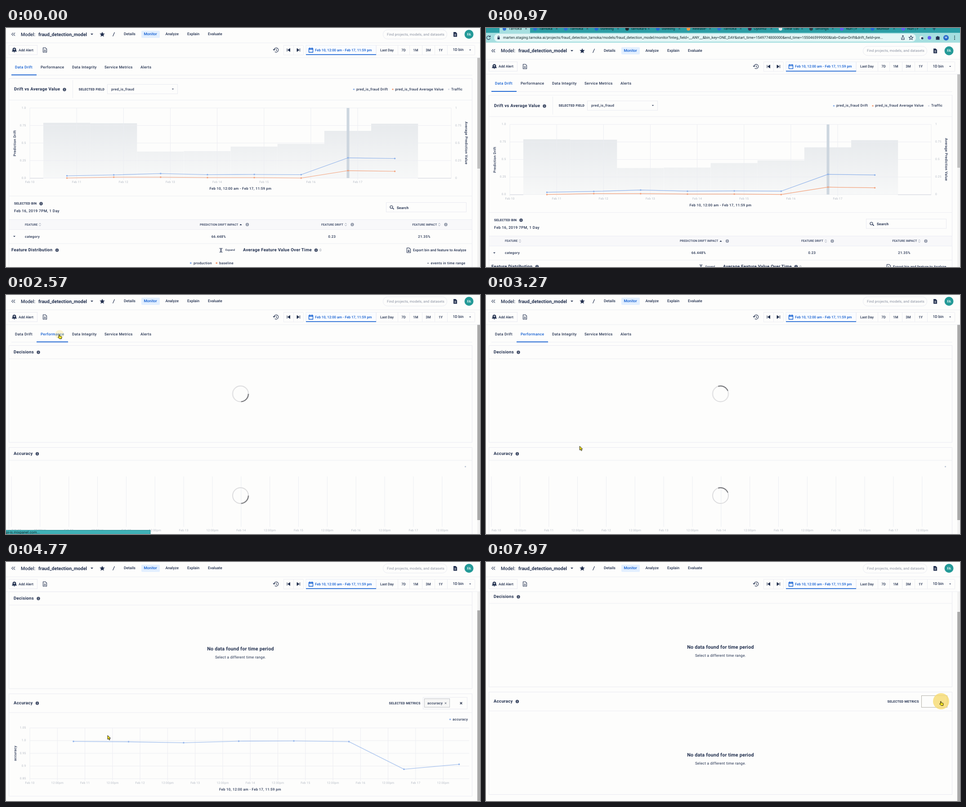
An HTML page for the animation above (8000 ms loop, 1054 by 532 pixels).

```html
<!DOCTYPE html>
<html lang="en">
<head>
<meta charset="utf-8">
<title>Model monitoring</title>
<style>
html, body { margin: 0; width: 100%; height: 100%; overflow: hidden; background: #fdfdfc; }
svg { display: block; width: 1054px; height: 532px; }
text { font: 500 7.8px Roboto, Arial, sans-serif; fill: #22304f; dominant-baseline: central; text-rendering: geometricPrecision; white-space: pre; }
.nav { font-size: 8.4px; }
.tab { font-size: 8.4px; letter-spacing: .3px; }
.model { font-size: 10.5px; }
.h { font-size: 9.6px; font-weight: 700; letter-spacing: .3px; }
.big { font-size: 10.8px; font-weight: 700; letter-spacing: .18px; }
.cap { font-size: 7.2px; font-weight: 700; letter-spacing: .22px; }
.th { font-size: 6.6px; font-weight: 700; letter-spacing: .1px; fill: #45516d; }
.b { letter-spacing: .32px; }
.ax { font-size: 6.6px; font-weight: 400; letter-spacing: .2px; fill: #b4bac4; }
.hint { font-weight: 400; letter-spacing: .15px; fill: #8990a0; }
.sub { font-size: 8.4px; font-weight: 400; letter-spacing: .2px; }
.date { letter-spacing: .36px; font-size: 8.4px; }
.tiny { font-size: 6px; letter-spacing: .2px; }
.url { font-size: 8.2px; font-weight: 400; fill: #10282b; }
.bold { font-weight: 700; }
.blue { fill: #0d5bd0; }
.white { fill: #fff; }
.edge { fill: none; stroke: #e9eaf1; }
.grid { stroke: #ecedf2; fill: none; }
.ink { fill: none; stroke: #22304f; stroke-width: 1.1; }
.solid { fill: #22304f; }
.paper { fill: #fdfdfc; }

.cut { animation: 8s step-end infinite; }
.move { animation: 8s ease-in-out infinite; }
#app { animation-name: app; }
#drift { animation-name: drift; }
#perf { animation-name: perf; }
#scroll { animation-name: scroll; }
#thumb { animation-name: thumb; }
#status { animation-name: status; }
#loading { animation-name: loading; }
#loaded { animation-name: loaded; }
#data { animation-name: data; }
#cleared { animation-name: cleared; }
#tabDrift { animation-name: tabDrift; }
#tabPerf { animation-name: tabPerf; }
#bar { animation-name: bar; }
#cursor { animation-name: cursor; }
#arrow { animation-name: arrow; }
#hand { animation-name: hand; }
#halo { animation-name: halo; }
.spin { animation: spin 1s -.43s linear infinite; }

@keyframes app { 0%, 1.5% { transform: none } 5%, 11.9% { transform: translateY(37px) } 15.6%, 100% { transform: none } }
@keyframes drift { 0% { opacity: 1 } 31.25%, 100% { opacity: 0 } }
@keyframes perf { 0% { opacity: 0 } 31.25%, 100% { opacity: 1 } }
@keyframes scroll { 0%, 55.6% { transform: none } 60.6%, 100% { transform: translateY(-50px) } }
@keyframes thumb {
  0%, 1.5% { y: 66px; height: 247px; fill: #c1c1c1 }
  5%, 11.9% { y: 66px; height: 208px; fill: #c1c1c1 }
  15.6%, 31.24% { y: 66px; height: 247px; fill: #c1c1c1 }
  31.25%, 42.49% { y: 66px; height: 435px; fill: #aaa }
  42.5%, 55.6% { y: 66px; height: 424px; fill: #aaa }
  60.6%, 100% { y: 111px; height: 424px; fill: #aaa }
}
@keyframes status { 0% { opacity: 0 } 31.25% { opacity: 1 } 38.75%, 100% { opacity: 0 } }
@keyframes loading { 0% { opacity: 1 } 42.5%, 100% { opacity: 0 } }
@keyframes loaded { 0% { opacity: 0 } 42.5%, 100% { opacity: 1 } }
@keyframes data { 0% { opacity: 1 } 97.5%, 100% { opacity: 0 } }
@keyframes cleared { 0% { opacity: 0 } 97.5%, 100% { opacity: 1 } }
@keyframes tabDrift { 0% { fill: #0d5bd0 } 31.25%, 100% { fill: #22304f } }
@keyframes tabPerf { 0% { fill: #22304f } 17.5%, 100% { fill: #0d5bd0 } }
@keyframes bar { 0% { x: 12px; width: 56px } 31.25%, 100% { x: 68px; width: 70px } }
@keyframes cursor {
  0%, 11.5% { transform: translate(270px, -25px) }
  19.6% { transform: translate(137px, 94px) }
  23.8%, 33% { transform: translate(119px, 88px) }
  44%, 62.9% { transform: translate(226px, 386px) }
  68.4%, 75% { transform: translate(701px, 355px) }
  88%, 100% { transform: translate(1012px, 310px) }
}
@keyframes arrow { 0% { opacity: 1 } 17.5% { opacity: 0 } 34.5% { opacity: 1 } 86%, 100% { opacity: 0 } }
@keyframes hand { 0% { opacity: 0 } 17.5% { opacity: 1 } 34.5% { opacity: 0 } 86%, 100% { opacity: 1 } }
@keyframes halo {
  0%, 29% { opacity: 0; transform: scale(.4) }
  30%, 31.25% { opacity: .8; transform: scale(1) }
  32.2% { opacity: .3; transform: scale(.55) }
  32.8%, 95.9% { opacity: 0; transform: scale(.4) }
  97.2%, 100% { opacity: .8; transform: scale(1) }
}
@keyframes spin { to { transform: rotate(360deg) } }
</style>
</head>
<body>
<svg id="stage" viewBox="0 0 1054 532"></svg>
<script>
const text = (x, y, s, cls = '', anchor = 'start', extra = '') =>
  `<text x="${x}" y="${y}" class="${cls}" text-anchor="${anchor}" ${extra}>${s.replace(/&/g, '&amp;')}</text>`;
const mid = (x, y, s, cls) => text(x, y, s, cls, 'middle');
const end = (x, y, s, cls) => text(x, y, s, cls, 'end');
const rect = (x, y, w, h, attrs) => `<rect x="${x}" y="${y}" width="${w}" height="${h}" ${attrs}/>`;
const path = (d, attrs = 'class="ink"') => `<path d="${d}" ${attrs}/>`;
const dot = (x, y, r, fill) => `<circle cx="${x}" cy="${y}" r="${r}" fill="${fill}"/>`;
const group = (attrs, ...parts) => `<g ${attrs}>${parts.join('')}</g>`;
const list = (n, f) => Array.from({ length: n }, (_, i) => f(i)).join('');
const hline = (x1, x2, y, cls = 'grid') => path(`M${x1} ${y}H${x2}`, `class="${cls}"`);
const vline = (x, y1, y2, cls = 'grid') => path(`M${x} ${y1}V${y2}`, `class="${cls}"`);
const caret = (x, y, r = 3) => path(`M${x - r} ${y - r / 2}h${2 * r}l${-r} ${r}z`, 'class="solid"');
const info = (x, y, fill = '#3d4963') => dot(x, y, 3.7, fill) +
  path(`M${x} ${y - .6}v2.6M${x} ${y - 2.2}v1`, 'stroke="#fff" fill="none"');
const sort = (x, y) => path(`M${x - 2} ${y - 1}l2 -2 2 2M${x - 2} ${y + 1}l2 2 2 -2`, 'fill="none" stroke="#7d869b" stroke-width=".9"');
const cross = (x, y, r, w) => path(`M${x - r} ${y - r}l${2 * r} ${2 * r}M${x + r} ${y - r}l${-2 * r} ${2 * r}`, `stroke="#333d55" stroke-width="${w}"`);
const sheet = (x, y, cls) => path(`M${x - 4} ${y - 5}h5.2l2.8 2.8v7.2h-8zM${x - 2} ${y}h4M${x - 2} ${y + 2.4}h4`, `class="${cls}"`);
const series = (x0, dx, ys, color) =>
  path('M' + ys.map((y, i) => `${x0 + dx * i} ${y}`).join('L'), `fill="none" stroke="${color}" stroke-width="1.2"`) +
  ys.map((y, i) => dot(x0 + dx * i, y, 1.8, color)).join('');
const spinner = (x, y) => group(`transform="translate(${x} ${y})"`,
  '<circle r="17.5" fill="none" stroke="#dcdcde" stroke-width="2"/>',
  path('M17.5 0A17.5 17.5 0 0 1 1.5 17.4', 'class="spin" fill="none" stroke="#66676b" stroke-width="2"'));

const BLUE = '#8fb2ea', ORANGE = '#f3a27c', RANGE = 'Feb 10, 12:00 am - Feb 17, 11:59 pm';

function browserBar() {
  const tabs = ['Tarnoka', 'Tarnoka', 'Tarnoka', 'odreling', 'tarnoka-s', 'odreling', 'Release-', 'Tarnoka', 'Optimiz', 'clear cac', 'Settings', 'Nurl | F', 'Monitor', 'Nurl | F'];
  const marks = ['#2f6fd6', '#2f6fd6', '#2f6fd6', '#2469d8', '#1d2730', '#2469d8', '#f39a3d', '#2f6fd6', '#3a2b4d', '#e9edf0', '#30404a', '#625df5', '#2469d8', '#625df5'];
  const url = 'marten.staging.tarnoka.ai/projects/fraud_detection_tarnoka/models/fraud_detection_model/monitor?integ_field=__ANY__&bin_key=ONE_DAY&start_time=1549774800000&end_time=1550465999000&tab=Data+Drift&drift_field=pre...';
  return group('transform="translate(0 -37)"',
    rect(0, -12, 1054, 24, 'fill="#2b9ea5"'),
    rect(0, 11, 1054, 22, 'fill="#a6dfe0"'),
    rect(30, -12, 68, 24, 'fill="#a6dfe0"'),
    tabs.map((name, i) => {
      const x = 50 + 68.2 * i;
      return dot(x - 9, 2, 4, marks[i]) + text(x, 2, name, 'url') + cross(x + 39, 2, 1.8, .9) + vline(x + 48, -2, 7, 'url');
    }).join(''),
    path('M993 2h7M996.5 -1.5v7'),
    rect(18, 13, 938, 17.5, 'rx="8.7" fill="#e4f6f6"'),
    path('M8.8 19.5A4 4 0 1 0 9.5 23M9.5 17v3h-3'),
    rect(25.5, 21, 5, 4.5, 'class="solid"'), path('M26.5 21v-1.5a1.5 1.5 0 0 1 3 0V21'),
    text(38, 22, url, 'url'),
    path('M924 21v5h6v-5M927 24v-7M925 19l2-2 2 2'),
    path('M945 17.5l1.3 3 3.2.3-2.4 2.1.7 3.1-2.8-1.6-2.8 1.6.7-3.1-2.4-2.1 3.2-.3z'),
    dot(968, 22, 4, '#e8f2f3'), dot(970, 23, 2.5, '#31435f'),
    dot(986, 22, 4, '#625df5'),
    path('M1000.5 19.5h2.5a1.5 1.5 0 0 1 3 0h2.5v7h-8z', 'class="solid"'),
    dot(1023, 22, 6, '#2467c9'), mid(1023, 22, 'M', 'tiny white'),
    [18.5, 22, 25.5].map(y => dot(1042, y, 1, '#10282b')).join(''));
}

function header() {
  const nav = [[262, 'Details'], [354.5, 'Analyze'], [403, 'Explain'], [449, 'Evaluate']];
  const dividers = [617.5, 639.5, 661.5, 823.5, 871.5, 897.5, 925.5, 953.5, 981.5, 1042.5];
  return rect(0, -4, 1054, 70, 'class="paper"') + hline(0, 1054, 33) + hline(0, 1054, 66) +
    path('M16 10.5l-3.2 3.5 3.2 3.5M20 10.5l-3.2 3.5 3.2 3.5') +
    text(33, 14, 'Model:', 'model') + text(72, 14, 'fraud_detection_model', 'model bold') + caret(191, 14) +
    path('M214 8.5l1.7 3.7 4 .4-3 2.7.9 4-3.6-2.1-3.6 2.1.9-4-3-2.7 4-.4z', 'class="solid"') +
    path('M237.5 18.5l4-9') +
    rect(301, 6, 41, 16, 'rx="2" fill="#e2efff"') + text(306.5, 14, 'Monitor', 'nav blue') +
    nav.map(([x, s]) => text(x, 14, s, 'nav')).join('') +
    rect(838.5, 4, 142, 20.5, 'rx="10" class="edge"') + text(847, 14, 'Find projects, models, and datasets', 'hint') +
    path('M995 9h5l3 3v7.5h-8z', 'class="solid"') + path('M997 14h4M997 16.5h4', 'stroke="#fff"') +
    dot(1029.5, 14, 10, '#249a98') + mid(1029.5, 14, 'FA', 'white') +
    rect(6.5, 38.5, 63, 21, 'class="edge"') +
    path('M13.5 52h10l-1.5-2v-2.5c0-4.5-7-4.5-7 0V50zM17 53.5h3', 'class="solid" stroke="#22304f"') +
    path('M18.5 45.5v4M16.5 47.5h4', 'stroke="#fff"') +
    text(28, 49, 'Add Alert') + sheet(86.5, 49, 'ink') +
    path('M596 49a4.8 4.8 0 1 1 1.6 3.6M594 47.5l2 2 2-2M600.8 46.5v3l2 1.2') +
    dividers.map(x => vline(x, 39, 60)).join('') +
    hline(617, 661, 38.5) + hline(617, 661, 60) + hline(823, 1042, 38.5) + hline(823, 1042, 60) +
    path('M625 45.5v7M631.5 45.5v7l-5-3.5z', 'class="solid" stroke="#22304f"') +
    path('M653.5 45.5v7M647 45.5v7l5-3.5z', 'class="solid" stroke="#22304f"') +
    rect(667, 38.5, 156, 20.5, 'fill="#fafcff" stroke="#e9edf5"') + rect(667, 58.5, 156, 1.6, 'class="blue"') +
    path('M673.5 45.5h9v8.5h-9zM673.5 47.5h9M675.5 43.5v2M680.5 43.5v2', 'fill="none" stroke="#0d5bd0" stroke-width="1.3"') +
    text(687, 49, RANGE, 'blue') + text(832, 49, 'Last Day') +
    [[884, '7D'], [911, '1M'], [939, '3M'], [966.5, '1Y']].map(([x, s]) => mid(x, 49, s)).join('') +
    text(993.5, 49, '1D bin', 'nav') + caret(1032, 49, 2);
}

const tabs = () =>
  text(20, 87.5, 'Data Drift', 'tab cut', 'start', 'id="tabDrift"') +
  text(77, 87.5, 'Performance', 'tab cut', 'start', 'id="tabPerf"') +
  text(147, 87.5, 'Data Integrity', 'tab') + text(219, 87.5, 'Service Metrics', 'tab') + text(299, 87.5, 'Alerts', 'tab') +
  hline(12, 1037, 105) + rect(12, 103.5, 56, 1.8, 'id="bar" class="cut blue"');

function driftPage() {
  const step = 104.15, x0 = 53;
  const tops = [211, 212, 275, 274, 264, 258, 229, 213];
  const rows = ['1.0', '0.75', '0.5', '0.25', '0.0'];
  const key = (x, s, c) => dot(x, 136.5, 1.7, c) + text(x + 5.5, 136, s, 'b');
  return '<linearGradient id="fade" gradientUnits="userSpaceOnUse" x1="0" x2="0" y1="205" y2="334"><stop stop-color="#e6e9ec"/><stop offset="1" stop-color="#f7f8f8"/></linearGradient>' +
    rect(6.5, 112.5, 1030, 500, 'class="edge"') + hline(6, 1037, 160.5) + vline(148.5, 116, 156) +
    text(18, 136.5, 'Drift vs Average Value', 'h') + info(130, 137) +
    text(161.5, 136, 'SELECTED FIELD', 'cap') + rect(225.5, 125.5, 156, 21, 'class="edge"') +
    text(234, 136, 'pred_is_fraud', 'b') + caret(371, 136, 2.2) +
    key(773.5, 'pred_is_fraud Drift', BLUE) + key(860, 'pred_is_fraud Average Value', ORANGE) + key(984.5, 'Traffic', '#d8dce6') +
    tops.map((y, i) => rect(83 + step * i, y, step, 334 - y, 'fill="url(#fade)"')).join('') +
    rows.map((s, i) => {
      const y = 178 + 39 * i;
      return hline(x0, 990, y) + end(44.5, y - .5, s, 'ax') + text(999, y - .5, String(+s), 'ax');
    }).join('') +
    list(8, i => vline(x0 + step * i, 178, 338) + mid(x0 + step * i, 343, 'Feb ' + (10 + i), 'ax')) +
    vline(990, 178, 334) +
    path('M53 334.5h30M916 334.5h74', 'stroke="#d4d6de"') +
    rect(757.5, 178, 6, 156, 'fill="#cdd6df"') +
    series(135.5, step, [329, 327, 324, 326.5, 326, 326.5, 289, 290.5], BLUE) +
    series(135.5, step, [334, 332, 332, 333, 333, 334, 317.5, 319], ORANGE) +
    group('transform="translate(19.5 256.5) rotate(-90)"', mid(0, 0, 'Prediction Drift', 'b')) +
    group('transform="translate(1023 256) rotate(90)"', mid(0, 0, 'Average Prediction Value', 'b')) +
    mid(521.5, 357.5, RANGE, 'b') + hline(6, 1037, 374) +
    text(18, 390.5, 'SELECTED BIN', 'cap') + info(78, 391) + text(18, 408, 'Feb 16, 2019 7PM, 1 Day', 'date') +
    rect(845.5, 388.5, 178, 21, 'class="edge"') +
    path('M860 401l2.5 2.5', 'stroke="#22304f" stroke-width="1.7"') + '<circle cx="857" cy="398.5" r="3" class="ink" stroke-width="1.5"/>' +
    text(869, 400, 'Search', 'b bold') +
    rect(6.5, 426.5, 1030, 22, 'fill="#f8f8fa" stroke="#ebecf3"') +
    text(42, 437.5, 'FEATURE', 'th') + sort(75.5, 437.5) +
    text(431, 437.5, 'PREDICTION DRIFT IMPACT', 'th') + path('M519.5 439h5l-2.5-3z', 'class="solid"') + info(536.5, 437.5, '#949bab') +
    text(701, 437.5, 'FEATURE DRIFT', 'th') + sort(755.5, 437.5) + info(770, 437.5, '#949bab') +
    text(903.5, 437.5, 'FEATURE IMPACT', 'th') + sort(963.5, 437.5) + info(978, 437.5, '#949bab') +
    caret(18.5, 464, 2.5) + text(42, 464, 'category', 'b') +
    mid(473, 464, '66.448%', 'b') + mid(725, 464, '0.23', 'b') + mid(930, 464, '21.35%', 'b') + hline(6, 1037, 480) +
    text(12, 494.5, 'Feature Distribution', 'h') + info(113.5, 494.5) +
    path('M474.5 490.5h7M474.5 499h7M478 492v6M476.5 493.5l1.5-1.5 1.5 1.5M476.5 496l1.5 1.5 1.5-1.5', 'class="ink" stroke-width=".9"') +
    text(488, 494.5, 'Expand', 'tiny') +
    text(527, 494.5, 'Average Feature Value Over Time', 'h') + info(689.5, 494.5) + text(697, 494.5, '0', 'hint') +
    path('M891.5 489.5h5l3 3v7.5h-8zM895.5 493v5M893.5 496l2 2 2-2') + text(905, 494.5, 'Export bin and feature to Analyze', '', 'start', 'letter-spacing=".1"') +
    rect(409, 521.5, 3.5, 3.5, `fill="${BLUE}"`) + text(417, 523, 'production', 'b') +
    rect(466.5, 521.5, 3.5, 3.5, `fill="${ORANGE}"`) + text(474, 523, 'baseline', 'b') +
    hline(937, 940, 523.5, 'ink') + text(944.5, 523, 'events in time range', 'b');
}

const timeLabel = i => i % 2 ? '12:00pm' : 'Feb ' + (10 + i / 2);
const noData = y => mid(521.5, y, 'No data found for time period', 'big') + mid(521.5, y + 20, 'Select a different time range.', 'sub');

function accuracyChart() {
  const step = 61.28;
  return ['1.05', '1.0', '0.95', '0.9', '0.85'].map((s, i) => {
    const y = 415.5 + 28.25 * i;
    return hline(53, 1030, y) + end(44.5, y - .5, s, 'ax');
  }).join('') +
    list(16, i => vline(53 + step * i, 415.5, 533) + mid(53 + step * i, 538, timeLabel(i), 'ax')) +
    series(150, 122.5, [445.5, 446.3, 448.5, 445, 444.5, 446, 507.5, 496.5], BLUE) +
    dot(987.5, 396.5, 1.8, BLUE) + text(993, 396, 'accuracy', 'b') +
    group('transform="translate(20 472) rotate(-90)"', mid(0, 0, 'accuracy', 'b')) +
    mid(543, 552.5, RANGE, 'b');
}

function perfPage() {
  const step = 63.85;
  const title = y => text(17, y, 'Accuracy', 'h') + info(69.5, y + .5);
  return rect(6.5, 112.5, 1030, 215.5, 'class="edge"') + hline(6, 1037, 142) +
    text(17, 127.5, 'Decisions', 'h') + info(72, 127.5) +
    rect(6.5, 339.5, 1030, 228, 'class="edge"') +
    group('id="loading" class="cut"',
      spinner(521.5, 220), title(353), hline(6, 1037, 368),
      dot(1021.5, 382, 1.6, '#b9c3d4'),
      list(16, i => vline(12 + step * i, 404, 516) + mid((i ? 12 : 23) + step * i, 524, timeLabel(i), 'ax')),
      spinner(521.5, 446.5)) +
    group('id="loaded" class="cut"',
      noData(239), title(360), hline(6, 1037, 381.5),
      group('id="data" class="cut"',
        text(851.5, 360, 'SELECTED METRICS', 'cap'), rect(927.5, 347.5, 98, 26, 'class="edge"'),
        rect(930.5, 350.5, 56, 19, 'fill="#f7f7f6" stroke="#bfc2c8"'),
        text(937, 360, 'accuracy', 'b'), cross(977.5, 360.5, 1.7, 1), cross(1012, 360.5, 2.3, 1.6),
        accuracyChart()),
      group('id="cleared" class="cut"',
        text(892.5, 360, 'SELECTED METRICS', 'cap'), rect(968.5, 347.5, 57, 26, 'fill="none" stroke="#b3b1aa"'),
        noData(479)));
}

const pointer = 'fill="#f7e51c" stroke="#111" stroke-width=".9" stroke-linejoin="round"';
document.getElementById('stage').innerHTML =
  group('id="app" class="move"',
    rect(0, 0, 1054, 532, 'class="paper"'),
    group('id="scroll" class="move"',
      tabs(),
      group('id="drift" class="cut"', driftPage()),
      group('id="perf" class="cut"', perfPage())),
    rect(1048, 66, 6, 466, 'fill="#f1f1f1"'),
    rect(1048, 66, 6, 247, 'id="thumb" class="move"'),
    header(), browserBar()) +
  group('id="status" class="cut"',
    rect(-4, 523.5, 325, 12, 'fill="#3fb0b6" stroke="#2b8a90"'), text(0, 529, 'pi-is.mixpanel.com...', 'url')) +
  group('id="cursor" class="move"',
    '<circle id="halo" class="move" r="18" fill="#f7dc72"/>',
    group('id="arrow" class="cut"', path('M0 0v8.8l2-1.8 1.5 3.3 1.7-.8-1.5-3.2h2.8z', pointer)),
    group('id="hand" class="cut"', path('M-1.5 5.5V1c0-1.3 1.7-1.3 1.7 0v2.5l3.6.6c1 .2 1.3.8 1.2 1.6l-.5 3.8h-4.5L-3.2 6.3c-.4-1 .7-1.5 1.7-.8z', pointer)));
</script>
</body>
</html>
```
